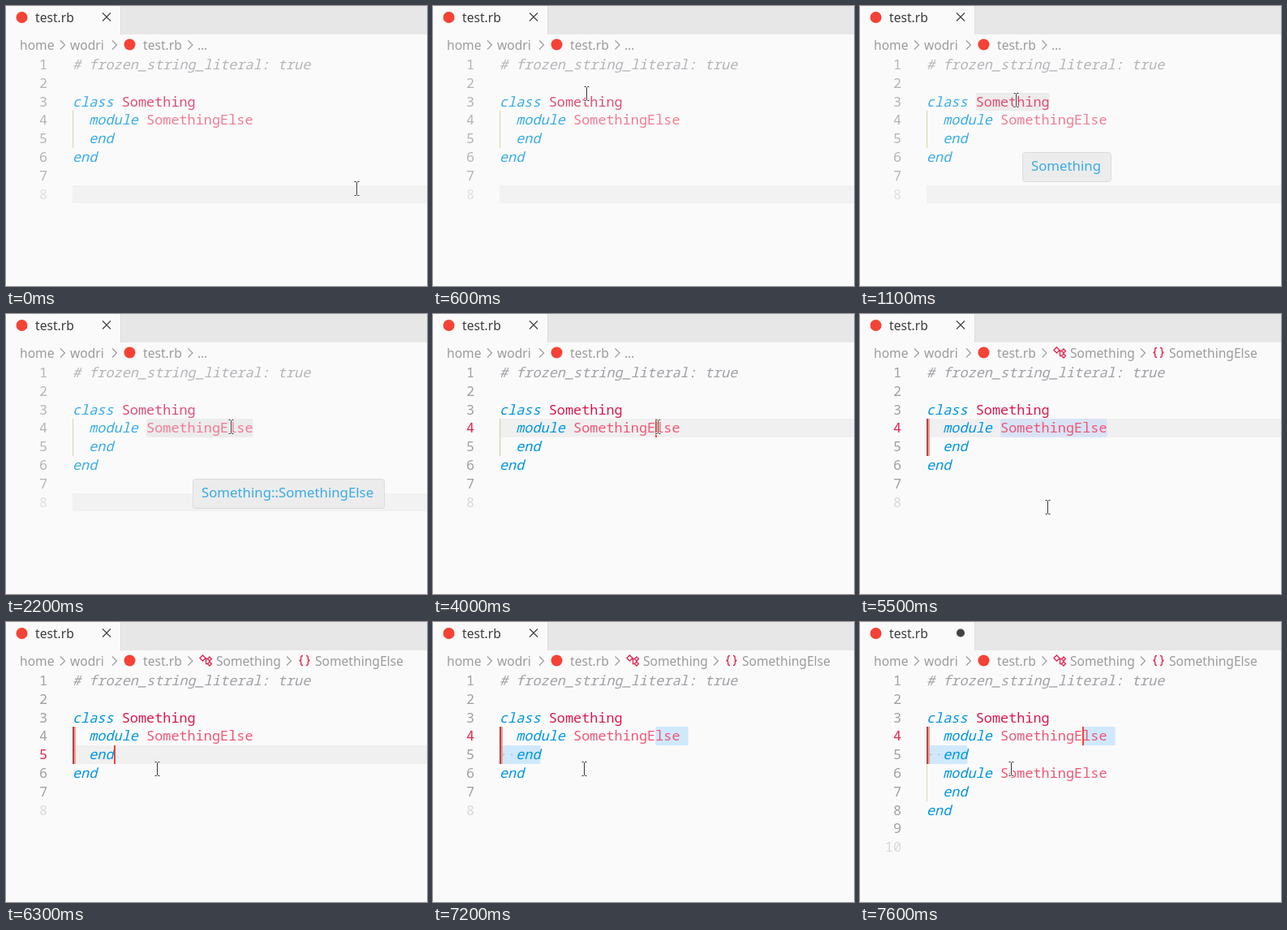
An HTML page that plays this animation: 519 px wide and 345 px high, repeating every 8000 ms.

```html
<!DOCTYPE html>
<html lang="en">
<head>
<meta charset="utf-8">
<title>Editor</title>
<style>
  html, body { margin: 0; width: 100%; height: 100%; overflow: hidden; background: #fafafa; }
  svg { display: block; width: 519px; height: 345px; }
  text { font: 15.6px "Noto Sans", sans-serif; white-space: pre; }
  .code { font: 16.86px "Noto Sans Mono", monospace; }
  .hover { font-size: 16.8px; fill: #0095e0; }
  .kw { fill: #0095e0; font-style: italic; }
  .cls { fill: #d8184c; }
  .mod { fill: #f05574; }
  .note { fill: #a0a1a7; font-style: italic; }
  .tab { fill: #3c3c3c; }
  .crumb { fill: #9c9c9c; }
  .line { fill: none; stroke: #9c9c9c; stroke-width: 1.2; }
  .sym { fill: none; stroke: #e0234e; stroke-width: 1.3; }
</style>
</head>
<body>
<svg id="stage" viewBox="0 0 519 345"></svg>
<script>
const LOOP = 8000, STEP = 100;
const LEFT = 82, CHAR = 16.86 * .6, TOP = 61, ROW = 22.8;
const RED = '#f44336';

// Moments when something happens
const FIRST_HOVER = 1000, SECOND_HOVER = 2200, CLICK = 4000, OUTLINE = 4200, MARK = 4300,
  NEXT_LINE = 6300, SELECT = 6700, COPY = 7500, DIRTY = 7600;

// Pointer moves: start time, end time, target
const home = { x: 433, y: 225 };
const moves = [
  { from: 0, to: 600, x: 190, y: 108 },
  { from: 700, to: 900, x: 193, y: 116 },
  { from: 1500, to: 1900, x: 278, y: 139 },
  { from: 4000, to: 4500, x: 166, y: 274 },
  { from: 4500, to: 4900, x: 248, y: 258 },
  { from: 5400, to: 5700, x: 187, y: 181 }
];

const col = n => LEFT + n * CHAR;
const row = n => Math.round(TOP + (n - 1) * ROW);
const rect = (x, y, w, h, fill, extra = '') =>
  `<rect x="${x}" y="${y}" width="${w}" height="${h}" fill="${fill}" ${extra}/>`;
const text = (x, y, s, cls, extra = '') =>
  `<text x="${x}" y="${y}" class="${cls}" ${extra}>${s}</text>`;
const dot = (x, y, r, fill) => `<circle cx="${x}" cy="${y}" r="${r}" fill="${fill}"/>`;
const path = (d, cls) => `<path d="${d}" class="${cls}"/>`;
const rows = (x, line, w, count, fill, extra) =>
  rect(x, row(line), w, row(line + count) - row(line), fill, extra);
const block = (line, from, to, fill) =>
  rows(col(from), line, (to - from) * CHAR, 1, fill, 'rx="2"');
const code = (line, start, s, cls) => text(col(start), row(line) + 17, s, 'code ' + cls);

function pointer(t) {
  let { x, y } = home;
  for (const m of moves) {
    const k = Math.min(1, Math.max(0, (t - m.from) / (m.to - m.from)));
    const ease = k * k * (3 - 2 * k);
    x += (m.x - x) * ease;
    y += (m.y - y) * ease;
  }
  const d = 'M-3 -8.5h2l1 1l1 -1h2M0 -7.5v15M-3 8.5h2l1 -1l1 1h2';
  return `<g transform="translate(${Math.round(x) - .5} ${Math.round(y)})" fill="none">
    <path d="${d}" stroke="#fff" stroke-width="3"/><path d="${d}" stroke="#333"/></g>`;
}

function tabBar(dirty) {
  return rect(142, 0, 377, 35, '#e7e7e7') + rect(141, 0, 1, 35, '#dcdcdc') +
    dot(19.5, 14, 7, RED) + text(36, 20, 'test.rb', 'tab') +
    (dirty ? dot(124, 13.5, 5, '#424242')
      : '<path d="M119 8.5l10 10m0 -10l-10 10" stroke="#424242" stroke-width="1.2"/>');
}

function crumbs(full) {
  const label = (x, s) => text(x, 54, s, 'crumb');
  const chevron = x => path(`M${x} 42.5l5.5 5.5l-5.5 5.5`, 'line');
  const diamond = (x, y, r) => `M${x - r} ${y}l${r} ${-r}l${r} ${r}l${-r} ${r}z`;
  const brace = (x, w) => `M${x} 41.5q${w} 0 ${w} 2v2q0 2 ${w} 2q${-w} 0 ${-w} 2v2q0 2 ${-w} 2`;
  const start = label(17, 'home') + chevron(67) + label(79, 'wodri') + chevron(131) +
    dot(152.5, 47.5, 7, RED) + label(169, 'test.rb') + chevron(224.5);
  if (!full) return start + label(236, '…');
  return start +
    path(diamond(242.5, 44.5, 3.5) + diamond(251, 45.5, 2.5) + diamond(251, 51.5, 2.5) +
      'M245.5 45.5h3M246.5 45.5v6h2', 'sym') +
    label(259, 'Something') + chevron(346) +
    path(brace(366, -2.3) + brace(370, 2.3), 'sym') + label(381, 'SomethingElse');
}

function hover(x, y, w, s, opacity = 1) {
  return `<g opacity="${opacity}">` +
    rect(x + .5, y + .5, w, 36, '#e8e8e8', 'rx="3" stroke="#d3d3d3"') +
    text(x + 11, y + 23, s, 'hover') + '</g>';
}

function moduleLines(line) {
  return code(line, 2, 'module', 'kw') + code(line, 9, 'SomethingElse', 'mod') +
    code(line + 1, 2, 'end', 'kw');
}

function editor(t) {
  const within = (from, to) => t >= from && t < to;
  const focus = t >= CLICK, selected = t >= SELECT, copied = t >= COPY;
  const last = copied ? 10 : 8;
  const active = !focus ? 8 : within(NEXT_LINE, SELECT) ? 5 : 4;
  let s = '';

  if (!selected) s += rows(LEFT, active, 437, 1, '#f0f0f0');
  if (within(FIRST_HOVER, SECOND_HOVER)) s += block(3, 6, 15, '#e8e8e8');
  if (within(SECOND_HOVER, CLICK)) s += block(4, 9, 22, '#e8e8e8');
  if (within(MARK, NEXT_LINE)) s += block(4, 9, 22, '#d9e3f6');
  if (selected) {
    s += block(4, 19, 23, '#cfe8fc') + block(5, 0, 5, '#cfe8fc');
    for (const n of [.5, 1.5]) s += dot(col(n), row(5) + 11.5, 1, '#a9bccb');
  }

  // Indent guides
  s += t >= MARK
    ? rows(LEFT, 4, 2, 2, '#a94a4a') + rows(LEFT + 2, 4, 2, 2, '#f79a94')
    : rows(LEFT, 4, 1.2, 2, '#d0d3a4');
  if (copied) s += rows(LEFT, 6, 1.2, 2, '#dcdec4');

  for (let n = 1; n <= last; n++) {
    const fill = n === last ? '#d8d8d8' : focus && n === active ? '#e0234e' : '#a0a0a0';
    s += text(51, row(n) + 17, n, 'code', `text-anchor="end" fill="${fill}"`);
  }

  s += code(1, 0, '# frozen_string_literal: true', 'note') +
    code(3, 0, 'class', 'kw') + code(3, 6, 'Something', 'cls') + moduleLines(4) +
    (copied ? moduleLines(6) : '') + code(last - 2, 0, 'end', 'kw');

  // The caret blinks every half second, restarting at each action
  const since = t - [COPY, SELECT, NEXT_LINE, CLICK].find(k => t >= k);
  if (since % 1000 < 500) s += rows(Math.round(col(active === 5 ? 5 : 19)), active, 2, 1, RED);

  if (within(FIRST_HOVER, SECOND_HOVER)) {
    s += hover(200, 180, 109, 'Something', Math.min(1, (t - FIRST_HOVER + STEP) / 200));
  }
  if (within(SECOND_HOVER, CLICK)) s += hover(230, 203, 236, 'Something::SomethingElse');
  return `<g opacity="${focus ? 1 : .77}">${s}</g>`;
}

const stage = document.getElementById('stage');
let shown = -1;

function frame(now) {
  const t = Math.floor(now % LOOP / STEP) * STEP;
  if (t !== shown) {
    shown = t;
    stage.innerHTML = tabBar(t >= DIRTY) + crumbs(t >= OUTLINE) + editor(t) + pointer(t);
  }
  requestAnimationFrame(frame);
}
frame(performance.now());
</script>
</body>
</html>
```
